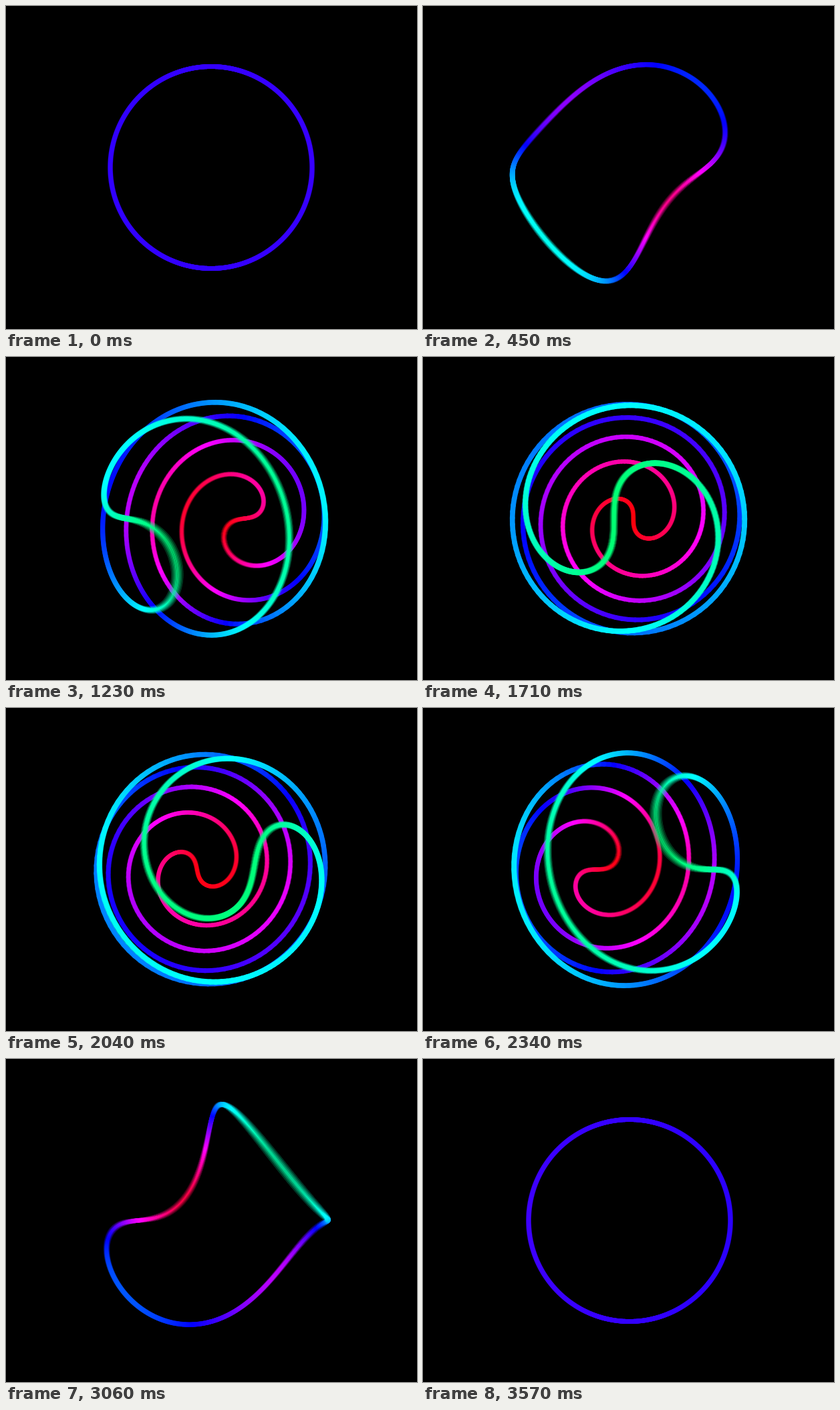
An HTML page with a canvas that plays this animation: 615 by 483 pixels, repeating every 3600 ms.

```html
<!DOCTYPE html>
<html lang="en">
<head>
<meta charset="utf-8">
<title>Twisted circle</title>
<style>
  html, body { margin: 0; width: 100%; height: 100%; overflow: hidden; background: #000; }
  canvas { display: block; }
</style>
</head>
<body>
<canvas id="stage" width="615" height="483"></canvas>
<script>
const W = 615, H = 483;
const LOOP = 3600, STEP = 30, FRAMES = LOOP / STEP;
const SAMPLES = 5, SHUTTER = 0.6;   // motion blur
const POINTS = 900;
const ZOOM = 302, CAMERA = 2;       // unit sphere seen from two radii away
const MAX_TWIST = 3 * Math.PI;

const ctx = document.getElementById('stage').getContext('2d');
const layer = document.createElement('canvas');
layer.width = W;
layer.height = H;
const pen = layer.getContext('2d');
pen.lineCap = 'round';

const smoother = x => x * x * x * (x * (6 * x - 15) + 10);

// A great circle twisted about its axis, the axis turning about the vertical.
function curvePoint(angle, twist, turn) {
  const axial = Math.sin(angle), radial = Math.cos(angle);
  const phi = twist * axial;
  const side = radial * Math.sin(phi);
  const x = axial * Math.sin(turn) + side * Math.cos(turn);
  const z = axial * Math.cos(turn) - side * Math.sin(turn);
  const scale = ZOOM / (CAMERA - z);
  return { x: W / 2 + x * scale, y: H / 2 + radial * Math.cos(phi) * scale, z };
}

function drawCurve(t) {
  const twist = MAX_TWIST * smoother(1 - Math.abs(2 * t - 1));
  const turn = Math.PI * (t - 0.5);
  const points = Array.from({ length: POINTS }, (_, i) =>
    curvePoint(2 * Math.PI * i / POINTS, twist, turn));
  const segments = points.map((p, i) => {
    const q = points[(i + 1) % POINTS];
    return { p, q, z: (p.z + q.z) / 2 };
  }).sort((a, b) => a.z - b.z);

  pen.fillStyle = '#000';
  pen.fillRect(0, 0, W, H);
  for (const { p, q, z } of segments) {
    pen.strokeStyle = `hsl(${(252 - 106 * z).toFixed(1)}, 100%, 50%)`;
    pen.lineWidth = 7 * Math.pow(CAMERA / (CAMERA - z), 0.35);
    pen.beginPath();
    pen.moveTo(p.x, p.y);
    pen.lineTo(q.x, q.y);
    pen.stroke();
  }
}

function render(frame) {
  ctx.globalCompositeOperation = 'source-over';
  ctx.globalAlpha = 1;
  ctx.fillStyle = '#000';
  ctx.fillRect(0, 0, W, H);
  ctx.globalCompositeOperation = 'lighter';
  ctx.globalAlpha = 1 / SAMPLES;
  for (let i = 0; i < SAMPLES; i++) {
    drawCurve((frame + i * SHUTTER / SAMPLES) / FRAMES);
    ctx.drawImage(layer, 0, 0);
  }
}

let shown = -1;
function tick() {
  const frame = Math.floor(performance.now() / STEP) % FRAMES;
  if (frame !== shown) render(shown = frame);
  requestAnimationFrame(tick);
}
tick();
</script>
</body>
</html>
```
